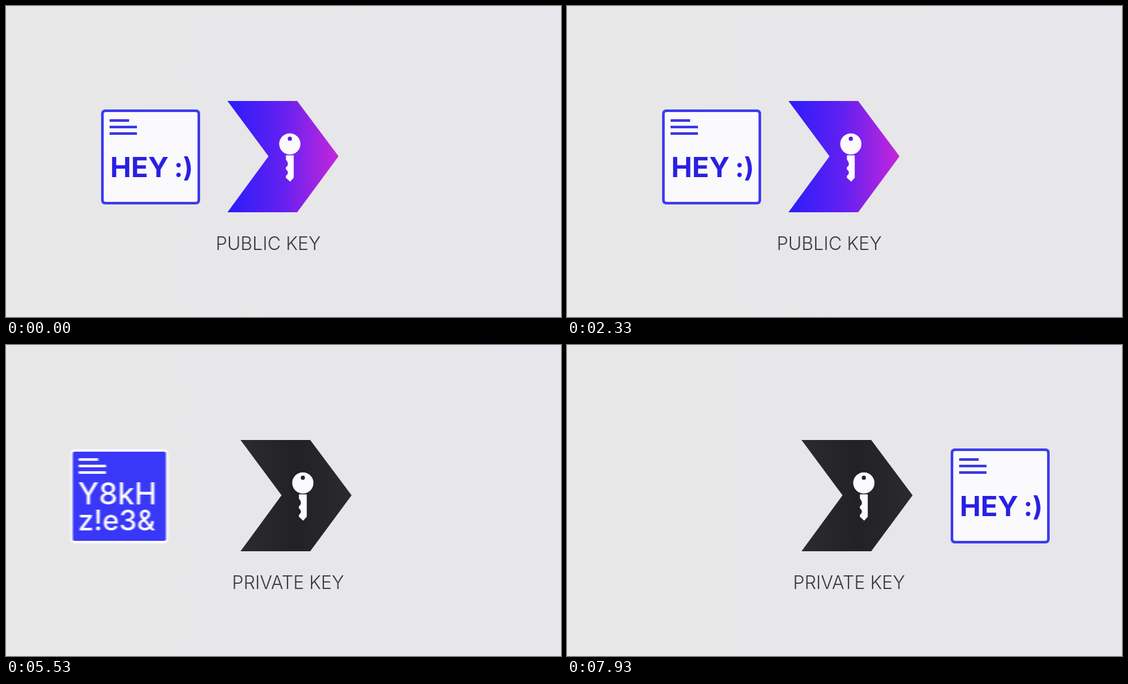
Write an HTML page with a canvas that moves like this. It is 852 px wide and 478 px high and loops after 8 s.

```html
<!DOCTYPE html>
<html lang="en">
<head>
<meta charset="utf-8">
<title>Public and private keys</title>
<style>
  html, body { margin: 0; width: 100%; height: 100%; overflow: hidden; background: #e8e8e9; }
  canvas { display: block; width: 100%; height: 100%; }
</style>
</head>
<body>
<canvas id="stage" width="852" height="478"></canvas>
<script>
const W = 852, H = 478, LOOP = 8000, STEP = 1000 / 15;
const SHUTTER = 26, SAMPLES = 10;
const FONT = 'Inter, "Open Sans", sans-serif';

const screen = document.getElementById('stage').getContext('2d');
const buffer = document.createElement('canvas');
buffer.width = W;
buffer.height = H;
const c = buffer.getContext('2d');

// Timing helpers
const clamp = v => Math.max(0, Math.min(1, v));
const span = (t, start, length) => clamp((t - start) / length);
const mix = (a, b, k) => a + (b - a) * k;
const easeOut = (u, p) => 1 - Math.pow(1 - u, p);

// Bezier easing with handles at (x1, 0) and (x2, 1)
function glide(u, x1, x2) {
  let lo = 0, hi = 1;
  for (let i = 0; i < 24; i++) {
    const s = (lo + hi) / 2, r = 1 - s;
    if (3 * r * r * s * x1 + 3 * r * s * s * x2 + s * s * s < u) lo = s;
    else hi = s;
  }
  return lo * lo * (3 - 2 * lo);
}

function gradient(x0, x1, ...colors) {
  const g = c.createLinearGradient(x0, 0, x1, 0);
  colors.forEach((color, i) => g.addColorStop(i / (colors.length - 1), color));
  return g;
}

function box(x, y, w, h, r, color) {
  c.fillStyle = color;
  c.beginPath();
  c.roundRect(x, y, w, h, r);
  c.fill();
}

function text(str, x, y, size, weight, color, align = 'left') {
  c.font = `${weight} ${size}px ${FONT}`;
  c.textAlign = align;
  c.fillStyle = color;
  c.fillText(str, x, y);
}

function lines(x, color) {
  [30, 42, 42].forEach((w, i) => box(x, 174 + i * 10, w, 4, 0.5, color));
}

// Cards are placed by their horizontal centre
function plainCard(cx) {
  const x = cx - 76;
  box(x, 159, 152, 146, 6, '#3f3cee');
  box(x + 4, 163, 144, 138, 3, '#fafafd');
  lines(x + 13, '#3c39e2');
  text('HEY', x + 14, 263, 43, 700, '#2a20e2');
  text(':)', x + 112, 263, 41, 700, '#2a20e2');
}

function cipherCard(cx) {
  const x = cx - 75.5;
  box(x, 160, 151, 145, 6, '#fbfbff');
  box(x + 4, 164, 143, 137, 3, '#3a38f8');
  lines(x + 13, '#fbfbff');
  text('Y8kH', x + 12, 245, 46, 500, '#fbfbff');
  text('z!e3&', x + 12, 285, 43.5, 500, '#fbfbff');
}

function clipped(x, w, draw) {
  c.save();
  c.beginPath();
  c.rect(x, -H, w, 3 * H);
  c.clip();
  draw();
  c.restore();
}

// A card changes its face at the line x = edge, hidden by the arrow
function passingCard(cx, edge, before, after) {
  if (cx + 76 > edge) clipped(edge, 2 * W, () => after(cx));
  if (cx - 76 < edge) clipped(edge - 2 * W, 2 * W, () => before(cx));
}

function key(x, hole) {
  c.fillStyle = '#fbfaff';
  c.beginPath();
  c.arc(x, 212, 16.3, 0, 7);
  c.fill();
  c.beginPath();
  c.moveTo(x - 6, 229.5);
  c.lineTo(x + 6, 229.5);
  c.lineTo(x + 6, 264);
  c.lineTo(x + 0.5, 270);
  c.lineTo(x - 6, 264);
  c.lineTo(x - 6, 261);
  c.quadraticCurveTo(x - 1, 257, x - 4, 253);
  c.quadraticCurveTo(x - 7, 251, x - 6, 248);
  c.quadraticCurveTo(x - 1, 244, x - 4, 239);
  c.lineTo(x - 6, 236);
  c.closePath();
  c.fill();
  c.fillStyle = hole;
  c.beginPath();
  c.arc(x, 204, 3.2, 0, 7);
  c.fill();
}

function arrow(x, fill, hole, label, labelX) {
  c.fillStyle = fill;
  c.beginPath();
  [[0, 146], [107, 146], [170.5, 231], [107, 317], [0, 317], [63, 231]]
    .forEach(([dx, y]) => c.lineTo(x + dx, y));
  c.fill();
  key(x + 95.7, hole);
  text(label, labelX, 375, 28, 300, '#38383c', 'center');
}

function publicScene(t) {
  const swing = 0.08 * Math.pow(Math.max(0, t - 3800) / 400, 4);
  c.save();
  c.translate(-60, 235);
  c.rotate(swing);
  c.translate(60, -235);

  const pass = start => mix(222, 636.5, glide(span(t, start, 840), 0.47, 0.13));
  const card = cx => passingCard(cx, 425, plainCard, cipherCard);
  if (t < 1900) {
    card(pass(430));
  } else {
    const out = Math.pow(span(t, 1900, 370), 3);
    if (out < 1) cipherCard(mix(636.5, 940, out));
    if (t < 2830) plainCard(mix(-80, 222, easeOut(span(t, 1960, 350), 3)));
    else card(pass(2830));
  }
  arrow(340, gradient(340, 511, '#2a1dfb', '#6420f0', '#c627da'), '#5b20d8', 'PUBLIC KEY', 402.5);
  c.restore();
}

function privateScene(t) {
  c.save();
  c.translate(0, 345 * (1 - easeOut(span(t, 4530, 600), 3)));
  if (t > 5235) {
    if (t < 6630) {
      c.globalAlpha = span(t, 5235, 120);
      cipherCard(mix(123.5, 224.5, easeOut(span(t, 5270, 900), 2)));
      c.globalAlpha = 1;
    } else {
      const cx = mix(224.5, 665, glide(span(t, 6630, 1290), 0.2, 0.1));
      passingCard(cx, 445, cipherCard, plainCard);
    }
  }
  arrow(360, gradient(360, 530, '#2c2b30', '#222126', '#2b2a2f'), '#242328', 'PRIVATE KEY', 433);
  c.restore();
}

function scene(t) {
  c.fillStyle = gradient(0, W, '#e8e8e8', '#e7e6e9', '#e7e6ea');
  c.fillRect(0, 0, W, H);
  if (t < 4620) publicScene(t);
  if (t > 4530) privateScene(t);
}

// Average several moments to get motion blur
function render(t) {
  for (let i = 0; i < SAMPLES; i++) {
    const shift = ((i + 0.5) / SAMPLES - 0.5) * SHUTTER;
    scene(Math.max(0, Math.min(LOOP, t + shift)));
    screen.globalAlpha = 1 / (i + 1);
    screen.drawImage(buffer, 0, 0);
  }
}

let origin = null, last = -1;
function tick(now) {
  if (origin === null) origin = now;
  const step = Math.floor((((now - origin) % LOOP) + 5) / STEP);
  if (step !== last) {
    last = step;
    render(step * STEP);
  }
  requestAnimationFrame(tick);
}
requestAnimationFrame(tick);
</script>
</body>
</html>
```
